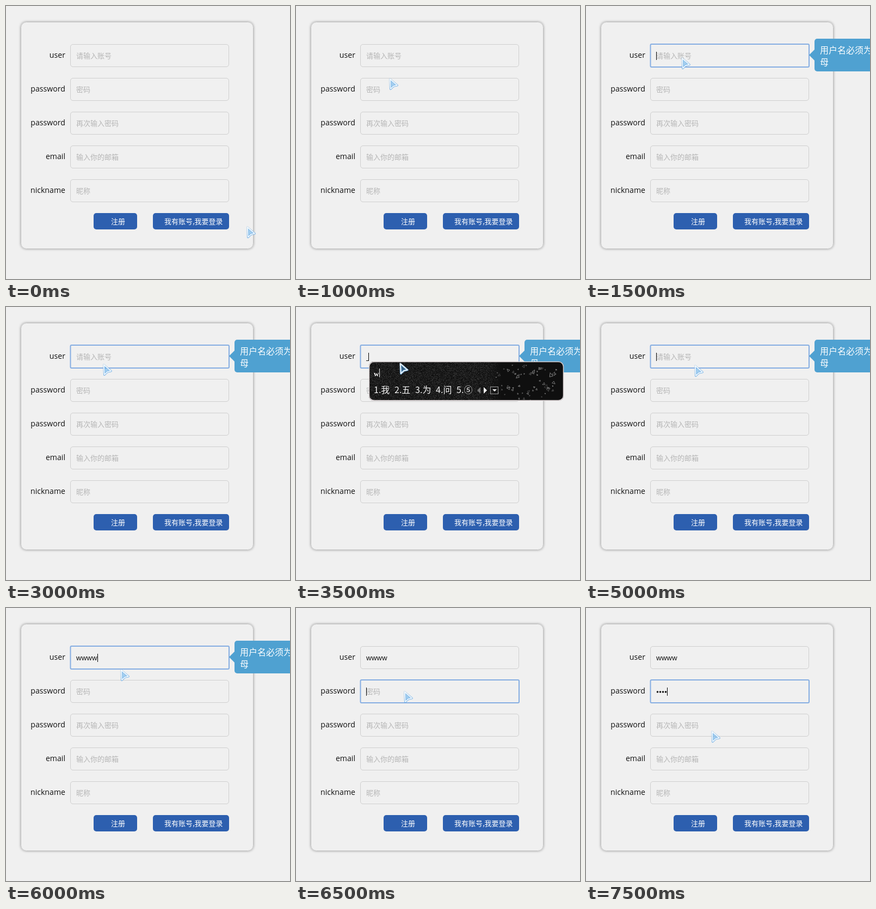
Recreate the animation shown at these times as an HTML page with a canvas. Size 522 by 501 pixels, loop 8 s.

```html
<!DOCTYPE html>
<html lang="zh-CN">
<head>
<meta charset="utf-8">
<title>Sign-up form</title>
<style>
html, body { margin: 0; width: 100%; height: 100%; overflow: hidden; background: #f0f0f0; }
canvas { display: block; }
</style>
</head>
<body>
<canvas id="stage" width="522" height="501"></canvas>
<script>
const ctx = document.getElementById('stage').getContext('2d');
const STEP = 500;
const CJK = '"Noto Sans CJK SC", "Noto Sans CJK", sans-serif';
const BG = '#f0f0f0';

const rows = [
  ['user', '请输入账号'],
  ['password', '密码'],
  ['password', '再次输入密码'],
  ['email', '输入你的邮箱'],
  ['nickname', '昵称']
];

const pinyin = {
  one: { keys: 'w', words: ['我', '五', '为', '问', '⑤'], art: 'shards' },
  four: { keys: "w'w'w'w", words: ['问问我我', '稳稳', '问问', '问我', '我问'], art: 'gem' },
  two: { keys: "w'w", words: ['稳稳', '问问', '问我', '我问', 'ww'], art: 'gem' }
};

// One entry per half second: pointer place, focused row, caret, typed values, input popup
const steps = [
  { at: [442, 404] },
  { at: [432, 392] },
  { at: [171, 132] },
  { at: [175, 94], focus: 0, caret: 1 },
  { at: [175, 94], focus: 0 },
  { at: [179, 109], focus: 0, caret: 1 },
  { at: [178, 104], focus: 0 },
  { at: [190, 102], focus: 0, caret: 1, ime: 'one' },
  { at: [195, 104], focus: 0, caret: 1, ime: 'four' },
  { at: [199, 106], focus: 0, caret: 1, ime: 'two' },
  { at: [199, 106], focus: 0, caret: 1 },
  { at: [199, 106], focus: 0, caret: 1, user: 'ww' },
  { at: [210, 112], focus: 0, caret: 1, user: 'wwww' },
  { at: [198, 152], focus: 1, caret: 1, user: 'wwww' },
  { at: [270, 183], focus: 1, user: 'wwww' },
  { at: [230, 225], focus: 1, caret: 1, user: 'wwww', dots: 4 }
];

function seeded(seed) {
  return () => {
    seed = (seed * 1664525 + 1013904223) >>> 0;
    return seed / 4294967296;
  };
}

function text(str, x, y, font, color, align = 'left') {
  ctx.font = font;
  ctx.fillStyle = color;
  ctx.textAlign = align;
  ctx.fillText(str, x, y);
}

function box(x, y, w, h, r) {
  ctx.beginPath();
  ctx.roundRect(x, y, w, h, r);
}

function poly(points) {
  ctx.beginPath();
  points.forEach(([x, y]) => ctx.lineTo(x, y));
  ctx.closePath();
}

function rect(x, y, w, h, color) {
  ctx.fillStyle = color;
  ctx.fillRect(x, y, w, h);
}

function drawPanel() {
  ctx.save();
  ctx.shadowColor = '#999';
  ctx.shadowBlur = 4;
  ctx.fillStyle = BG;
  box(27, 29, 428, 417, 10);
  ctx.fill();
  ctx.restore();
  ctx.strokeStyle = '#c2c2c2';
  ctx.lineWidth = 1;
  box(27.5, 29.5, 427, 416, 10);
  ctx.stroke();
}

function drawRow(i, s) {
  const y = 70 + i * 62;
  const [label, hint] = rows[i];
  const focused = s.focus === i;
  text(label, 109, y + 25, '14.15px "Open Sans", "Noto Sans", sans-serif', '#111', 'right');
  ctx.strokeStyle = focused ? '#86aee2' : '#cfcfcf';
  ctx.lineWidth = focused ? 2 : 1;
  if (focused) box(118.5, y, 291.5, 42, 2);
  else box(118.5, y + 0.5, 291, 41, 4.5);
  ctx.stroke();

  let caretX = 129;
  if (i === 0 && s.user) {
    text(s.user, 129, y + 26, '13.33px "Liberation Sans", Arial, sans-serif', '#111');
    caretX = Math.round(129 + ctx.measureText(s.user).width);
  } else if (i === 1 && s.dots) {
    ctx.fillStyle = '#111';
    for (let d = 0; d < s.dots; d++) {
      ctx.beginPath();
      ctx.arc(131.5 + d * 5, y + 83 - 62 + 62 - 62 + 1, 1.8, 0, 7);
      ctx.fill();
    }
    caretX = 129 + s.dots * 5;
  } else if (focused && s.ime) {
    rect(129, y + 28, 4, 1, '#111');
    caretX = 133;
  } else {
    text(hint, 129, y + 26, '13px ' + CJK, '#b6b6b6');
  }
  if (focused && s.caret) rect(caretX, y + 14, 1, 15, '#000');
}

function drawButton(x, w, label, tx) {
  ctx.fillStyle = '#2d5faf';
  box(x, 380, w, 30, 5);
  ctx.fill();
  text(label, tx, 400, '13px ' + CJK, '#fff');
}

function drawTip() {
  ctx.fillStyle = '#4fa1d1';
  box(420, 60, 180, 60, 5);
  ctx.fill();
  poly([[410, 90], [420, 80], [420, 100]]);
  ctx.fill();
  text('用户名必须为字', 430, 87, '16px ' + CJK, '#fff');
  text('母', 430, 109, '16px ' + CJK, '#fff');
}

// Grain of the popup skin, drawn once
const grain = document.createElement('canvas');
grain.width = 388;
grain.height = 72;
{
  const g = grain.getContext('2d');
  const rnd = seeded(7);
  for (let y = 0; y < 72; y++) {
    for (let x = 0; x < 388; x++) {
      const v = Math.round(14 + 42 * rnd() ** 2);
      g.fillStyle = `rgb(${v},${v},${v})`;
      g.fillRect(x, y, 1, 1);
    }
  }
}

function drawShards(cx, cy) {
  const rnd = seeded(23);
  ctx.lineWidth = 0.8;
  for (let i = 0; i < 62; i++) {
    const a = rnd() * 6.283;
    const d = 18 + 44 * rnd();
    const x = cx + Math.cos(a) * d;
    const y = cy + Math.sin(a) * d * 0.68;
    const size = 1 + 3.6 * rnd() ** 2;
    const turn = rnd() * 6.283;
    const v = Math.round(80 + 80 * rnd());
    ctx.strokeStyle = `rgb(${v},${v},${v})`;
    poly([0, 1.7, 3.9].map(k => [x + Math.cos(turn + k) * size, y + Math.sin(turn + k) * size]));
    ctx.stroke();
  }
}

function drawGem(cx, cy) {
  const rim = Array.from({ length: 10 }, (_, i) => {
    const a = (i * 36 - 90) * Math.PI / 180;
    return [cx + 24.5 * Math.cos(a), cy + 24.5 * Math.sin(a)];
  });
  const star = rim.filter((_, i) => i % 2);
  ctx.lineWidth = 0.7;
  ctx.strokeStyle = '#858585';
  poly(rim);
  ctx.stroke();
  poly(star);
  ctx.stroke();
  ctx.beginPath();
  star.forEach(([x, y]) => {
    ctx.moveTo(cx, cy);
    ctx.lineTo(x, y);
  });
  ctx.stroke();
}

function drawPopup({ keys, words, art }) {
  const font = '16px ' + CJK;
  let x = 143;
  let end = x;
  ctx.font = font;
  const items = words.map((word, i) => {
    const str = i + 1 + '.' + word;
    const item = [str, x];
    end = x + ctx.measureText(str).width;
    x = end + 8.7;
    return item;
  });
  end = Math.round(end);
  const right = end + 168;

  ctx.save();
  box(134, 100, right - 134, 72, 9);
  ctx.clip();
  rect(134, 100, right - 134, 72, '#0f0f0f');
  const edge = end + 60;
  ctx.drawImage(grain, 0, 0, edge - 134, 72, 134, 100, edge - 134, 72);
  const fade = ctx.createLinearGradient(end + 30, 0, edge, 0);
  fade.addColorStop(0, 'rgba(15,15,15,0)');
  fade.addColorStop(0.8, '#0f0f0f');
  ctx.fillStyle = fade;
  ctx.fillRect(end + 30, 100, 31, 72);
  if (art === 'shards') drawShards(right - 67, 136);
  else drawGem(right - 73, 140);
  ctx.restore();
  ctx.strokeStyle = '#d6ced0';
  ctx.lineWidth = 1.5;
  box(134.5, 100.5, right - 135, 71, 9);
  ctx.stroke();

  [...keys].forEach((key, i) =>
    text(key, 143 + 9 * i + (key === 'w' ? 0 : 2), 127, 'bold 13px "Liberation Serif", serif', '#fff'));
  rect(144 + 9 * keys.length, 113, 1, 16, '#eee');
  items.forEach(([str, ix]) => text(str, ix, 158, font, '#f4f4f4'));

  ctx.fillStyle = '#777';
  poly([[end + 9, 153], [end + 15, 147], [end + 15, 159]]);
  ctx.fill();
  ctx.fillStyle = '#fff';
  poly([[end + 21, 147], [end + 27, 153], [end + 21, 159]]);
  ctx.fill();
  ctx.strokeStyle = '#999';
  ctx.lineWidth = 1;
  ctx.strokeRect(end + 33.5, 146.5, 14, 13);
  ctx.fillStyle = '#fff';
  poly([[end + 37, 151], [end + 45, 151], [end + 41, 155]]);
  ctx.fill();
}

function drawPointer([x, y]) {
  ctx.save();
  ctx.translate(x, y);
  ctx.lineJoin = 'round';
  poly([[1.8, 2], [15, 13.5], [8.3, 15], [2.8, 20.2]]);
  const glow = ctx.createLinearGradient(2, 2, 10, 20);
  glow.addColorStop(0, 'rgba(150,190,225,.5)');
  glow.addColorStop(1, 'rgba(75,155,225,.9)');
  ctx.strokeStyle = glow;
  ctx.lineWidth = 3.6;
  ctx.stroke();
  ctx.fillStyle = 'rgba(85,170,235,.5)';
  ctx.fill();
  ctx.strokeStyle = 'rgba(250,253,255,.9)';
  ctx.lineWidth = 1.9;
  ctx.stroke();
  ctx.restore();
}

function draw(now) {
  const s = steps[Math.floor(now / STEP) % steps.length];
  rect(0, 0, 522, 501, BG);
  drawPanel();
  rows.forEach((_, i) => drawRow(i, s));
  drawButton(161, 80, '注册', 193);
  drawButton(270, 140, '我有账号,我要登录', 291);
  if (s.focus === 0) drawTip();
  if (s.ime) drawPopup(pinyin[s.ime]);
  drawPointer(s.at);
}

const start = performance.now();
function loop() {
  draw(performance.now() - start);
  requestAnimationFrame(loop);
}
loop();
</script>
</body>
</html>
```
